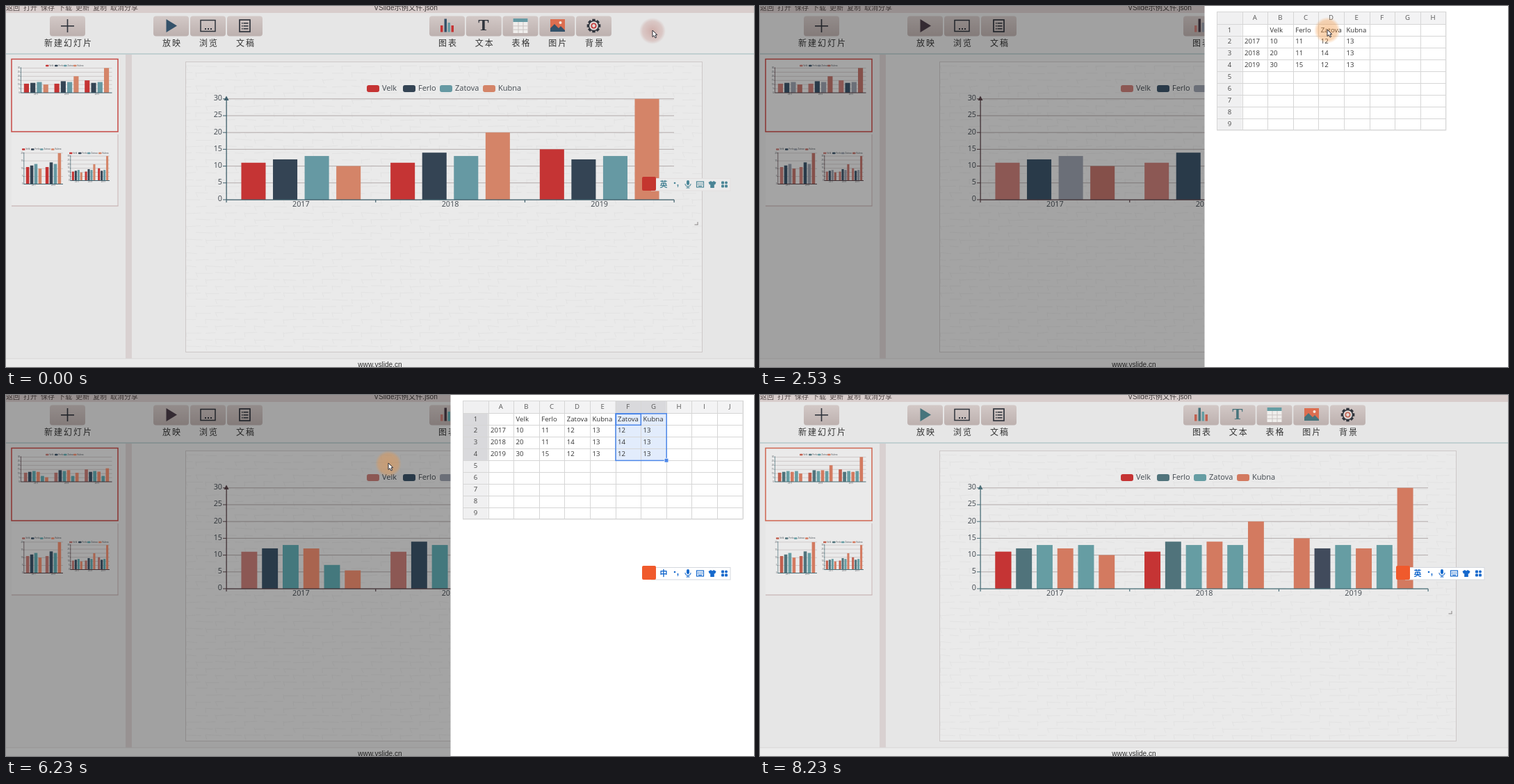
Animation of 1076 by 520 pixels, one loop 8.33 s. Source, as an HTML page with a canvas:

```html
<!DOCTYPE html>
<html lang="zh">
<head>
<meta charset="utf-8">
<style>
html,body{margin:0;width:100%;height:100%;overflow:hidden;background:#e6e6e6}
canvas{display:block}
</style>
</head>
<body>
<canvas id="stage" width="1076" height="520"></canvas>
<script>
const g = document.getElementById('stage').getContext('2d');
const W = 1076, H = 520, LOOP = 8330;
const SANS = '"Open Sans","Noto Sans","Noto Sans CJK SC","Noto Sans CJK",sans-serif';
const CJK = '"Noto Sans CJK SC","Noto Sans CJK",sans-serif';
const ARIAL = '"Liberation Sans","Noto Sans CJK SC","Noto Sans CJK",sans-serif';
const SERIF = '"Liberation Serif",serif';
const NAMES = ['Velk', 'Ferlo', 'Zatova', 'Kubna'];
const YEARS = ['2017', '2018', '2019'];
const BEFORE = [[11, 12, 13, 10], [11, 14, 13, 20], [15, 12, 13, 30]];
const AFTER = [[11, 12, 13, 12, 13, 10], [11, 14, 13, 14, 13, 20], [15, 12, 13, 12, 13, 30]];
const SHEET = [['', ...NAMES], ['2017', 10, 11, 12, 13], ['2018', 20, 11, 14, 13], ['2019', 30, 15, 12, 13]];

// Moments of the story, in ms
const T = {menu: 800, pick: 1400, open: 1430, drag: 2930, copy: 3830, target: 4630, paste: 5530, redraw: 6000, close: 6661};
const SLIDE = 222;
const CLICKS = [700, 1200, 2930, 4630, 6630];
const PATH = [
  [0, 930, 35], [100, 930, 36], [500, 840, 110], [700, 805, 138], [900, 805, 139], [1200, 827, 153],
  [1900, 828, 157], [2130, 868, 110], [2330, 848, 50], [2530, 816, 34], [2730, 809, 33], [2930, 812, 34],
  [3430, 848, 87], [4130, 848, 87], [4430, 885, 42], [4630, 890, 36], [5530, 890, 36], [6230, 550, 98],
  [6530, 514, 106], [7130, 512, 106], [7530, 760, 90], [7830, 1030, 14], [7930, 1030, -30]
];
const LOOKS = {
  start: {c: ['#c53434', '#344454', '#6699a3', '#d48468'], axis: '#41606c', ink: '#34526a'},
  dim: {c: ['#c87e78', '#3b5368', '#999fab', '#be726a'], axis: '#5c464c', ink: '#4a3c48'},
  dimNew: {c: ['#c87e78', '#3b5368', '#61abb3', '#f18f71'], axis: '#5c464c', ink: '#4a3c48'},
  end: {c: ['#c1604f', '#50737b', '#669da3', '#d37a60'], axis: '#4c7079', ink: '#47747c'}
};

const clamp = (v, a = 0, b = 1) => Math.min(b, Math.max(a, v));
const mix = (a, b, p) => a + (b - a) * p;
const smooth = p => (p = clamp(p), p * p * (3 - 2 * p));
const cubicOut = p => 1 - (1 - clamp(p)) ** 3;

function rect(x, y, w, h, fill) { g.fillStyle = fill; g.fillRect(x, y, w, h); }
function frame(x, y, w, h, color, lw = 1) { g.strokeStyle = color; g.lineWidth = lw; g.strokeRect(x, y, w, h); }
function round(x, y, w, h, r, fill) { g.fillStyle = fill; g.beginPath(); g.roundRect(x, y, w, h, r); g.fill(); }
function disc(x, y, r, fill) { g.fillStyle = fill; g.beginPath(); g.arc(x, y, r, 0, 7); g.fill(); }
function ring(x, y, r, color, lw = 1) { g.strokeStyle = color; g.lineWidth = lw; g.beginPath(); g.arc(x, y, r, 0, 7); g.stroke(); }
function poly(pts, fill, stroke, lw = 1) {
  g.beginPath();
  for (let i = 0; i < pts.length; i += 2) g.lineTo(pts[i], pts[i + 1]);
  g.closePath();
  if (fill) { g.fillStyle = fill; g.fill(); }
  if (stroke) { g.strokeStyle = stroke; g.lineWidth = lw; g.stroke(); }
}
function text(s, x, y, font, color, align = 'left', gap = 0) {
  g.font = font; g.fillStyle = color; g.textAlign = align;
  g.textBaseline = 'middle'; g.letterSpacing = gap + 'px';
  g.fillText(s, x, y);
}

// Faint brick paper of the slide
const paper = document.createElement('canvas');
paper.width = 743; paper.height = 418;
(function () {
  const p = paper.getContext('2d');
  let seed = 7;
  const rnd = () => (seed = seed * 16807 % 2147483647) / 2147483647;
  p.fillStyle = '#eaeaea'; p.fillRect(0, 0, 743, 418);
  p.strokeStyle = '#e3e3e3';
  p.beginPath();
  for (let row = 0; row < 44; row++) {
    const y = row * 9.6 + 5;
    for (let x = row % 2 * -14; x < 743; x += 28) {
      p.moveTo(x, y + rnd() * 2);
      p.lineTo(x + 12 + rnd() * 13, y + rnd() * 2);
      if (rnd() < .6) { p.moveTo(x, y); p.lineTo(x + rnd() * 3, y + 7); }
    }
  }
  p.stroke();
})();

function legend(xs, y, w, h, fs, c, gap) {
  xs.forEach((x, i) => {
    round(x, y - h / 2, w, h, h * .3, c[i]);
    text(NAMES[i], x + w + gap, y, fs + 'px ' + SANS, '#41484f');
  });
}

function chart(o, data, look) {
  const {x, y, w, unit, max, fs} = o, n = data.length, band = w / n, big = fs > 5;
  const tick = big ? 5 : 1, lw = big ? 1 : .7;
  for (let v = 0; v <= max; v += 5) {
    const ly = y - v * unit;
    if (v) rect(x, ly - lw / 2, w, lw, big ? '#b4acac' : '#c4bcbc');
    rect(x - tick, ly - lw / 2, tick, lw, look.axis);
    text(v, x - tick - (big ? 1 : .5), ly - (big ? .5 : 0), fs + 'px ' + SANS, '#41484f', 'right');
  }
  data.forEach((vals, k) => {
    const span = band * .8, bw = span / (vals.length + (vals.length - 1) * .3);
    vals.forEach((v, i) => {
      const special = big && k === 2 && look.last && look.last[i];
      const bx = x + k * band + band * .1 + i * bw * 1.3;
      rect(bx, y - v * unit, bw, v * unit, special || look.c[i < 4 ? i : i - 2]);
    });
    text(YEARS[k], x + (k + .5) * band, y + (big ? 7.5 : 2.2), fs + 'px ' + SANS, '#41484f', 'center');
  });
  rect(x, y - .5, w, big ? 1.3 : 1, look.axis);
  rect(x - .5, y - max * unit - (big ? 3 : 1), big ? 1.3 : .7, max * unit + (big ? 3 : 1), look.axis);
  for (let k = 0; k <= n; k++) rect(x + k * band - .5, y, big ? 1.2 : .6, tick - 1, look.axis);
  if (big) poly([x, 129.5, x + 3.5, 136, x - 3.5, 136], look.axis);
}

function values(t) {
  if (t < T.redraw) return BEFORE;
  const quick = cubicOut((t - T.redraw) / 300), slow = cubicOut((t - T.redraw) / 1000);
  return AFTER.map((row, k) => row.map((v, i) => i < 4 ? mix(BEFORE[k][i], v, quick) : v * slow));
}

function button(x, label, lx) {
  const s = g.createLinearGradient(0, 14, 0, 44);
  s.addColorStop(0, '#d3c9c7'); s.addColorStop(1, '#bcb0ae');
  round(x, 14.5, 51, 29, 4, s);
  text(label, lx, 53, '12px ' + CJK, '#333', 'left', 2);
}

function toolbar(look) {
  const ink = look.ink, dark = '#2f343c', red = look.c[0], teal = look.c[2];
  rect(0, 0, W, 10, '#d8cdcc');
  '返回 打开 保存 下载 更新 复制 取消分享'.split(' ').forEach((s, i) => text(s, i * 25, 2.5, '10px ' + CJK, '#544a4a'));
  text('VSlide示例文件.json', 575, 3, '10.2px ' + ARIAL, '#3c3838', 'center');
  rect(0, 68.5, W, 1, '#9dbabd');
  button(63, '新建幻灯片', 55);
  ['放映', '浏览', '文稿'].forEach((s, i) => button(212 + i * 53, s, 225 + i * 53));
  ['图表', '文本', '表格', '图片', '背景'].forEach((s, i) => button(609 + i * 52.75, s, 622 + i * 52.75));

  rect(79, 28, 19, 1.6, dark); rect(87.7, 19, 1.6, 19, dark);
  poly([230.5, 19, 246, 28.5, 230.5, 38], ink);
  frame(280, 20.5, 21, 16, dark, 1.5);
  for (let i = 0; i < 3; i++) rect(286 + i * 4, 32, 2, 2, dark);
  frame(336, 20, 15, 17, dark, 1.7);
  for (let i = 0; i < 3; i++) { rect(339, 24 + i * 4, 1.5, 1.5, dark); rect(341.5, 24 + i * 4, 7, 1.5, dark); }
  rect(625, 28, 3.5, 9.5, red); rect(630.5, 18.5, 3.5, 19, ink);
  rect(635.5, 24, 3.5, 13.5, teal); rect(640.5, 28, 3.5, 9.5, red);
  text('T', 687, 29, 'bold 23px ' + SERIF, ink === '#47747c' ? ink : dark, 'center');
  rect(729.5, 18, 21, 21, '#f0eeec'); rect(729.5, 18, 21, 5, teal);
  for (let i = 1; i < 3; i++) { rect(729.5 + i * 7, 23, 1, 16, '#c9c4c2'); rect(729.5, 23 + i * 5.3, 21, 1, '#c9c4c2'); }
  rect(783, 19, 21, 18, '#dc6e50');
  disc(797.5, 24, 2, '#f2e6dc');
  poly([783, 37, 783, 32, 789, 26, 795, 32, 798, 29, 804, 35, 804, 37], ink);
  for (let i = 0; i < 8; i++) {
    g.save(); g.translate(845.5, 28.5); g.rotate(i * Math.PI / 4);
    rect(-2.2, -9.8, 4.4, 4, dark); g.restore();
  }
  disc(845.5, 28.5, 7.8, dark); disc(845.5, 28.5, 6.3, '#e0d8d6'); ring(845.5, 28.5, 3.2, red, 1.6);
}

function page(t, look, vals) {
  rect(0, 0, W, H, '#e6e6e6');
  toolbar(look);
  rect(172, 70, 9, 438, '#d9d1d1');
  rect(0, 508, W, 12, '#ebebeb'); rect(0, 507.5, W, 1, '#d9d7d7');
  text('www.vslide.cn', 538, 517, '10.1px ' + ARIAL, '#333', 'center');

  // Thumbnails
  rect(8, 77, 153, 104, '#eaeaea'); rect(8, 185, 153, 103, '#eaeaea');
  frame(8, 76.5, 153, 104.5, t < T.close ? '#c64a46' : '#cf6650', 1.5);
  rect(8, 287.5, 153.5, 1, '#c2a9a9'); rect(160.5, 185, 1, 103, '#c9b3b3');
  const mini = {...look, last: null};
  chart({x: 21.5, y: 125, w: 131, unit: 1.19, max: 30, fs: 2.6}, vals, mini);
  legend([57, 70, 83, 97], 86, 4.5, 2.6, 3, look.c, 1);
  chart({x: 26, y: 256.5, w: 56, unit: 2.23, max: 20, fs: 2.6}, BEFORE.slice(0, 2), mini);
  legend([23, 36, 49, 65], 206.5, 4.5, 2.6, 3, look.c, 1);
  chart({x: 93, y: 251.5, w: 56, unit: 1.18, max: 30, fs: 2.6}, BEFORE, mini);
  legend([91, 104, 117, 133], 212, 4.5, 2.6, 3, look.c, 1);

  // Slide
  g.drawImage(paper, 259, 81);
  frame(258.5, 80.5, 743, 418, '#cdc8c8');
  chart({x: 317, y: 279, w: 644, unit: 4.84, max: 30, fs: 10.8}, vals, look);
  legend([519, 571, 624, 686], 119, 18, 10, 11, look.legend || look.c, 4);
  rect(990.5, 314.5, 5, 1, '#8c8888'); rect(994.5, 311, 1, 4, '#8c8888');
}

function menuIcon(i, x, y, c) {
  const box = (a, b, w, h) => frame(x + a, y + b, w, h, c, 1);
  if (i === 0) { box(-5, -5, 10, 10); rect(x - 5, y - 2, 10, 1, c); rect(x - 5, y + 1.5, 10, 1, c); rect(x - 1, y - 5, 1, 10, c); }
  if (i === 1) for (let k = -1; k < 2; k++) { rect(x + k * 4 - .5, y - 5, 1, 11, c); rect(x + k * 4 - 1.5, y + (k ? -3 : 1), 3, 2, c); }
  if (i === 2) { frame(x - 5, y - 5, 10, 10, '#8a8080', 1); rect(x - .5, y - 5, 1, 10, '#b4acac'); rect(x - 5, y - .5, 10, 1, '#b4acac'); }
  if (i === 3) {
    const pts = [];
    for (let k = 0; k < 10; k++) {
      const a = k * Math.PI / 5 - Math.PI / 2, r = k % 2 ? 2.3 : 5.5;
      pts.push(x + r * Math.cos(a), y + r * Math.sin(a));
    }
    poly(pts, c);
  }
  if (i === 4) poly([x + 1, y - 5, x + 5, y - 1, x + 3, y, x + 1, y + 4, x - 1, y + 2, x - 5, y + 5, x - 2, y + 1, x - 4, y - 1, x, y - 3], c);
  if (i === 5) { box(-2, -5, 7, 8); frame(x - 5, y - 3, 7, 8, c, 1); rect(x, y - 2.5, 3, 1, c); rect(x, y, 3, 1, c); }
  if (i === 6) { box(-3.5, -2.5, 7, 8); rect(x - 5, y - 4, 10, 1, c); rect(x - 1.5, y - 5.5, 3, 1, c); rect(x - 1.5, y - 1, 1, 5, c); rect(x + .8, y - 1, 1, 5, c); }
  if (i === 7) { round(x - 5, y - 5, 10, 10, 1, c); rect(x - 2.5, y - 4, 5, 2.5, '#f4f4f4'); disc(x, y + 2, 1.7, '#f4f4f4'); }
}

function menu(cursor) {
  round(804, 138, 56, 217, 2, '#f7f7f7');
  ['数据', '样式', '边框', '动画', '固定', '复制', '删除', '保存'].forEach((s, i) => {
    const y = 152 + i * 27.1, on = i === 0 && cursor.y > 142;
    if (i) rect(805, y - 13.5, 54, 1, '#e6e6e6');
    if (on) rect(805, 142, 55, 19, '#4a9df0');
    menuIcon(i, 821, y, on ? '#f4f6fa' : '#3a3a3a');
    text(s, 828.5, y, '11px ' + CJK, on ? '#fff' : '#333');
  });
}

const COL = c => 693.5 + c * 36.6, ROW = r => 26.3 + r * 16.9;

function selection(t, cur) {
  if (t < T.drag || t > T.close + SLIDE) return null;
  if (t < T.target) {
    const done = t >= 3430;
    return [3, 0, done ? 4 : clamp(Math.floor((cur.x - COL(0)) / 36.6), 3, 4), done ? 3 : clamp(Math.floor((cur.y - 26.3) / 16.9), 0, 3)];
  }
  return t < T.paste ? [5, 0, 5, 0] : [5, 0, 6, 3];
}

function sheet(t, cur) {
  const cols = t < T.paste ? 8 : 10, right = COL(cols), bottom = ROW(9), sel = selection(t, cur);
  const font = '9.6px ' + SANS, line = '#d6d6d6';
  rect(657, 8, right - 657, ROW(0) - 8, '#f3f3f4');
  rect(657, 8, 36.5, bottom - 8, t < T.close ? '#f0f0f1' : '#e9e9e9');
  if (sel) {
    const [a, b, c, d] = sel, x = COL(a), y = ROW(b), w = COL(c + 1) - x, h = ROW(d + 1) - y;
    rect(x, 8, w, ROW(0) - 8, '#d9d9dc');
    rect(657, y, 36.5, h, '#d9d9dc');
    if (w > 40 || h > 20) rect(x, y, w, h, '#e2ecfc');
  }
  for (let c = 0; c <= cols; c++) rect(Math.round(COL(c)), 8, 1, bottom - 8, line);
  for (let r = 0; r <= 9; r++) rect(657, Math.round(ROW(r)), right - 657, 1, line);
  frame(657.5, 8.5, right - 657, bottom - 8, line);
  for (let c = 0; c < cols; c++) text('ABCDEFGHIJ'[c], COL(c) + 18.3, 17.5, font, '#555', 'center');
  for (let r = 0; r < 9; r++) text(r + 1, 675.5, ROW(r) + 8.7, font, '#444', 'center');
  SHEET.forEach((row, r) => {
    const cells = t < T.paste ? row : [...row, row[3], row[4]];
    cells.forEach((s, c) => text(s, COL(c) + 3.5, ROW(r) + 8.7, font, '#333'));
  });
  if (!sel) return;
  const [a, b, c, d] = sel, x = COL(a), y = ROW(b), ex = COL(c + 1), ey = ROW(d + 1), blue = '#4b86e8';
  frame(x + .5, y + .5, ex - x, ey - y, blue, 1.5);
  frame(x + 1, y + 1, 35.8, 16, blue, 1.5);
  rect(ex - 3, ey - 3, 6, 6, '#fff'); rect(ex - 2.2, ey - 2.2, 5, 5, blue);
  if (t >= T.copy && t < 4430) {
    round(849.5, 58, 22, 22, 3, '#ec4d52');
    ring(859.5, 68, 5, '#fff', 1.4);
    g.beginPath(); g.moveTo(863.3, 71.8); g.lineTo(866.5, 75); g.stroke();
  }
}

function inputBar(t) {
  const early = t < 1000, c = early ? '#4a8596' : '#1568cc';
  rect(928, 248, 114, 18, early ? '#ebebeb' : '#fff');
  frame(928.5, 248.5, 113.5, 17.5, early ? '#e2dfdf' : '#d4d8de');
  round(915, 246, 20, 20, 2, early ? '#c4362f' : '#f05a2c');
  text(t > T.drag && t < T.close ? '中' : '英', 946, 257, 'bold 11px ' + CJK, c, 'center');
  disc(962, 255, 1.3, c); text(',', 966.5, 256, 'bold 12px ' + ARIAL, c, 'center');
  round(979, 251, 4, 7, 2, c);
  g.strokeStyle = c; g.lineWidth = 1.1; g.beginPath(); g.arc(981, 256, 4, 0, Math.PI); g.stroke();
  rect(980.5, 260, 1, 2, c); rect(978.5, 261.5, 5, 1, c);
  frame(993.5, 253, 10, 8, c, 1.2);
  for (let i = 0; i < 6; i++) rect(995 + i % 3 * 2.7, 255 + (i / 3 | 0) * 2, 1.4, 1.2, c);
  rect(996, 259, 5, 1, c);
  poly([1010.5, 254, 1014, 252, 1016, 253.5, 1018, 252, 1021.5, 254, 1020, 257.5, 1018.8, 257, 1018.8, 262, 1013.2, 262, 1013.2, 257, 1012, 257.5], c);
  for (let i = 0; i < 4; i++) round(1029 + i % 2 * 5, 252.5 + (i >> 1) * 5, 4, 4, i === 1 ? 2 : 1, c);
}

function place(t) {
  let i = 1;
  while (i < PATH.length - 1 && PATH[i][0] < t) i++;
  const [t0, x0, y0] = PATH[i - 1], [t1, x1, y1] = PATH[i], p = smooth((t - t0) / (t1 - t0));
  return {x: mix(x0, x1, p), y: mix(y0, y1, p)};
}

function pointer(t, {x, y}) {
  if (y < -25) return;
  const pale = t < 700 || t >= 6430, rgb = pale ? '186,120,112' : '243,149,62';
  const glow = g.createRadialGradient(x, y + 1, 0, x, y + 1, 19);
  glow.addColorStop(0, `rgba(${rgb},${pale ? .5 : .45})`);
  glow.addColorStop(.75, `rgba(${rgb},${pale ? .27 : .37})`);
  glow.addColorStop(1, `rgba(${rgb},0)`);
  disc(x, y + 1, 19, glow);
  for (const c of CLICKS) {
    const age = t - c;
    if (age >= 0 && age < 300) ring(x - .5, y + .5, 4 + age * .035, t < 2000 ? '#d2402f' : '#d96a50', 2);
  }
  poly([x, y, x, y + 9.5, x + 2.2, y + 7.5, x + 4, y + 11, x + 5.6, y + 10.2, x + 4, y + 6.8, x + 6.8, y + 6.6], '#fff', '#2c2c34', 1);
}

function lookAt(t) {
  if (t < T.open) return LOOKS.start;
  if (t < T.redraw) return LOOKS.dim;
  if (t < T.close) return {...LOOKS.dimNew, legend: LOOKS.dim.c};
  const end = {...LOOKS.end, last: [LOOKS.end.c[3], '#414b5c']};
  return end;
}

function step(t) {
  if (t < 1900) return Math.floor(t / 100) * 100;
  if (t < 2030) return 1900;
  const s = Math.floor((t - 30) / 100) * 100 + 30;
  return s > 7930 && s < 8230 ? 7930 : s;
}

function draw(t) {
  const cur = place(t), look = lookAt(t), vals = values(t);
  if (t >= 7430) {
    look.legend = ['#c53434', ...look.c.slice(1)];
  }
  page(t, look, vals);
  if (t >= 7430) {
    const bw = 644 / 3 * .8 / 7.5;
    for (let k = 0; k < 2; k++) rect(317 + 644 / 3 * (k + .1), 279 - 11 * 4.84, bw, 11 * 4.84 - .5, '#c53434');
  }
  if (t >= T.menu && t < T.pick) menu(cur);

  const leave = (t - T.close) / SLIDE;
  const shut = t < T.close ? 1 - smooth((t - T.open) / SLIDE) : smooth(leave);
  if (shut < 1) {
    const shade = t < T.close ? 1 - shut : 1 - smooth(leave * 1.35);
    rect(0, 0, W, H, `rgba(0,0,0,${.3 * shade})`);
    g.save();
    g.translate(436.5 * shut, 0);
    rect(639.5, 0, 437, H, '#fff');
    sheet(t, cur);
    g.restore();
  }
  if (t < 400 || t >= 3230 && t < 6530 || t >= 8230) inputBar(t);
  pointer(t, cur);
}

const born = performance.now();
function tick() {
  draw(step((performance.now() - born) % LOOP));
  requestAnimationFrame(tick);
}
tick();
</script>
</body>
</html>
```
